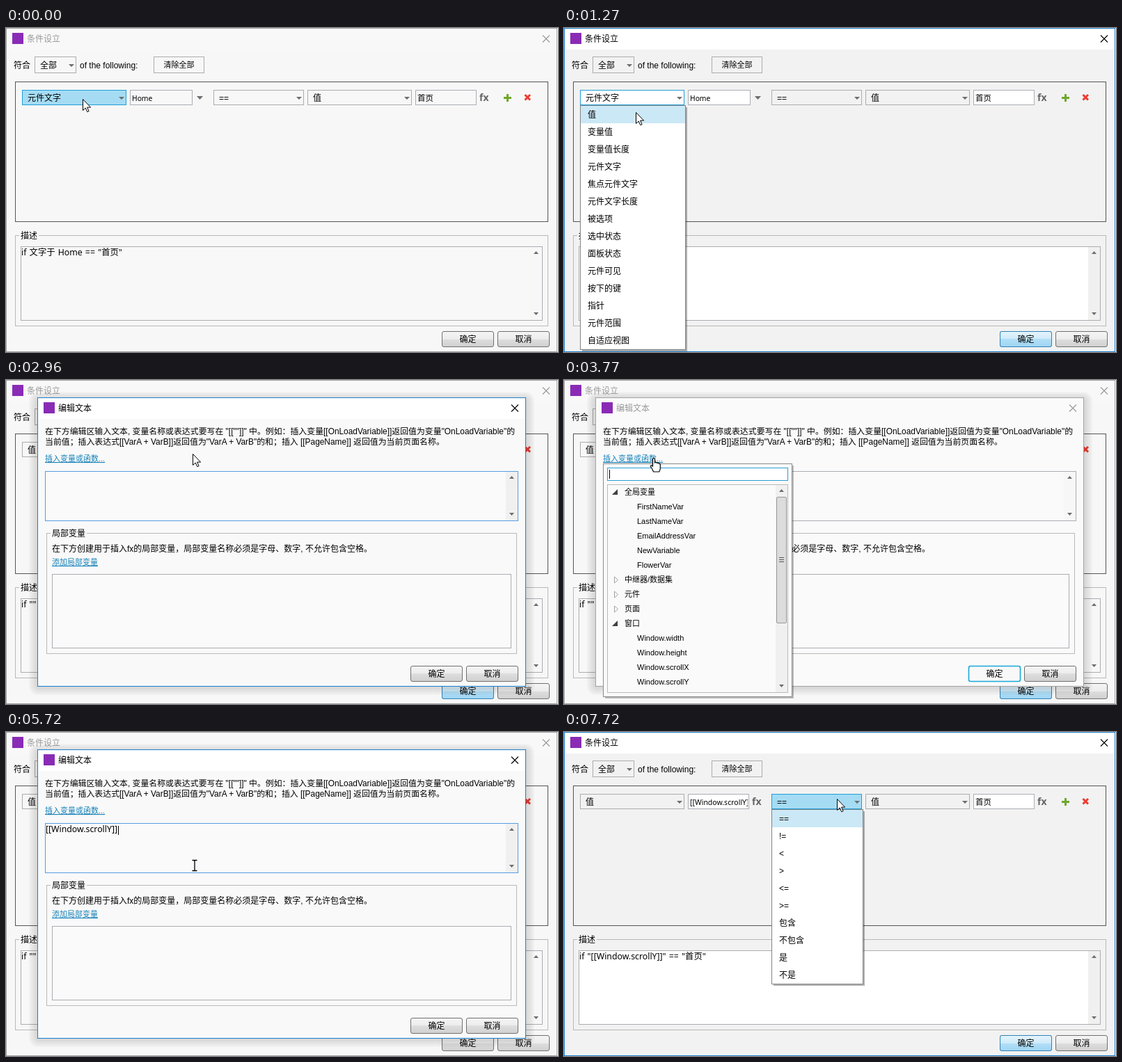
An HTML page that plays this animation: 793 px wide and 466 px high, repeating every 7.99 s.

```html
<!DOCTYPE html>
<html lang="zh-CN">
<head>
<meta charset="utf-8">
<title>条件设立</title>
<style>
html, body { margin: 0; width: 100%; height: 100%; overflow: hidden; background: #fff; }
svg { display: block; width: 793px; height: 466px; }
text { font: 12px "Liberation Sans", "Noto Sans CJK SC", sans-serif; fill: #000; white-space: pre; }
.ui { font-family: "Noto Sans", "Noto Sans CJK SC", sans-serif; }
.fx { font: bold 14px "Open Sans", "Noto Sans", sans-serif; fill: #666; }
.link { fill: #1480b8; text-decoration: underline; }
.win { --bar: #fff; --body: #f2f2f2; --field: #fff; --track: #f0f0f0; --edge: #1a80cf; --ink: #000; }
.win.off { --bar: #f8f8f8; --body: #f7f7f7; --field: #f8f8f8; --track: #f7f7f7; --edge: #a3a3a3; --ink: #999; }
.dialog { --body: #f9f9f9; --field: #fafafa; }
.dialog.off { --bar: #fafafa; --body: #fafafa; --field: #fafafa; }
.frame { fill: var(--body); stroke: var(--edge); }
.bar { fill: var(--bar); }
.title { fill: var(--ink); }
.cross { stroke: var(--ink); stroke-width: 1.1; fill: none; }
.field { fill: var(--field); stroke: #abadb3; }
.track { fill: var(--track); }
.combo { fill: var(--body); stroke: #acacac; }
.hot .combo { fill: #a5dcf4; stroke: #1f9fd8; }
.open .combo { fill: #fff; stroke: #1f9fd8; }
.tri { fill: #6d6d6d; }
.line { fill: none; stroke: #b9b9b9; }
.panel { fill: none; stroke: #555; }
.patch { fill: var(--body); }
.focus { stroke: #569de5; }
</style>
</head>
<body>
<script>
const LOOP = 7990;
const NS = "http://www.w3.org/2000/svg";
const make = (tag, attrs, parent) => {
  const node = document.createElementNS(NS, tag);
  for (const key in attrs) node.setAttribute(key, attrs[key]);
  return parent.appendChild(node);
};
const group = (parent, cls = "") => make("g", { class: cls }, parent);
const fill = (p, x, y, x2, y2, attrs) =>
  make("rect", { x, y, width: x2 - x, height: y2 - y, ...attrs }, p);
const box = (p, x, y, x2, y2, cls, more) =>
  fill(p, x + .5, y + .5, x2 - .5, y2 - .5, { class: cls, ...more });
const path = (p, d, attrs) => make("path", { d, ...attrs }, p);
const text = (p, x, y, str, size = 12, cls = "", anchor = "start") => {
  const node = make("text", { x, y, class: cls, "text-anchor": anchor }, p);
  node.style.fontSize = size + "px";
  node.textContent = str;
  return node;
};
const tri = (p, x, y, w = 4, h = 4) =>
  path(p, `M${x - w} ${y}h${2 * w}l${-w} ${h}z`, { class: "tri" });

const svg = make("svg", { viewBox: "0 0 793 466" }, document.body);
const defs = make("defs", {}, svg);
function gradient(id, stops) {
  const g = make("linearGradient", { id, x2: 0, y2: 1 }, defs);
  stops.forEach((color, i) =>
    make("stop", { offset: [0, .5, .5, 1][i], "stop-color": color }, g));
}
gradient("grey", ["#f5f5f5", "#ececec", "#dedede", "#d0d0d0"]);
gradient("blue", ["#e6f5fd", "#cfeafa", "#b2dff7", "#9fd5f3"]);

function button(p, x, y, label) {
  const shape = (color, stroke) => make("rect", {
    x: x + .5, y: y + .5, width: 74, height: 22, rx: 2.5, fill: color, stroke }, p);
  shape("url(#grey)", "#707070");
  const glow = shape("url(#blue)", "#2f83b8");
  const ring = shape("#f8f8f8", "#19a9d8");
  ring.setAttribute("stroke-width", 1.6);
  glow.style.opacity = ring.style.opacity = 0;
  text(p, x + 37.5, y + 16, label, 12, "", "middle");
  return { glow, ring };
}

function combo(p, x, y, x2, y2, label) {
  const g = group(p);
  box(g, x, y, x2, y2, "combo");
  g.label = text(g, x + 8, y + (y2 - y) / 2 + 4.5, label);
  tri(g, x2 - 7, (y + y2) / 2 - 1);
  return g;
}

function scrollArea(p, x, y, x2, y2) {
  const area = box(p, x, y, x2, y2, "field");
  fill(p, x2 - 18, y + 1, x2 - 1, y2 - 1, { class: "track" });
  tri(p, x2 - 9.5, y + 11, 3.5, -4);
  tri(p, x2 - 9.5, y2 - 12, 3.5, 4);
  return area;
}

function fieldset(p, x, y, x2, y2, label) {
  box(p, x, y, x2, y2, "line");
  fill(p, x + 6, y - 2, x + 10 + label.length * 12, y + 3, { class: "patch" });
  text(p, x + 8, y + 5, label);
}

function frame(p, x, y, x2, y2, label) {
  box(p, x, y, x2, y2, "frame");
  fill(p, x + 1, y + 1, x2 - 1, y + 31, { class: "bar" });
  fill(p, x + 9, y + 7, x + 25, y + 23, { fill: "#8a2bb5" });
  text(p, x + 30, y + 20, label, 12, "title");
  path(p, `M${x2 - 21} ${y + 10.5}l10 10m0 -10l-10 10`, { class: "cross" });
}

function list(x, x2, items) {
  const g = group(svg), bottom = 113 + items.length * 25;
  fill(g, x + 3, 114, x2 + 2, bottom + 2, { fill: "#000", opacity: .3 });
  box(g, x, 111, x2, bottom, "", { fill: "#fff", stroke: "#848484" });
  fill(g, x + 1, 112, x2 - 1, 137, { fill: "#cbe8f6" });
  items.forEach((item, i) => text(g, x + 11, 129 + i * 25, item));
  return g;
}

// Condition window
const main = group(svg, "win");
frame(main, 0, 0, 792, 466, "条件设立");
text(main, 11, 58, "符合");
combo(main, 41, 41, 101, 65, "全部");
text(main, 106, 58, "of the following:");
box(main, 212, 41, 285, 65, "combo");
text(main, 248.5, 57, "清除全部", 11, "", "middle");
box(main, 13, 77, 779, 279, "panel");

const kind = combo(main, 23, 89, 173, 111, "元件文字");
const home = group(main);
box(home, 178, 89, 268, 111, "field");
text(home, 181, 105, "Home", 10.3, "ui");
tri(home, 278.5, 98, 4.5, 5);

const formula = group(main);
const fxHover = box(formula, 266, 89, 288, 111, "", { fill: "#cbe8f6", stroke: "#26a0da" });
box(formula, 178, 89, 266, 111, "field");
const clip = make("clipPath", { id: "inner" }, defs);
fill(clip, 179, 90, 264, 110, {});
const typed = text(formula, 181, 105, "[[Window.scrollY]]", 10.5, "ui");
typed.setAttribute("clip-path", "url(#inner)");
text(formula, 270, 105, "fx", 14, "fx");

const operator = combo(main, 298, 89, 428, 111, "==");
combo(main, 433, 89, 583, 111, "值");
box(main, 588, 89, 676, 111, "field");
text(main, 591, 105, "首页", 11.5);
text(main, 680, 105, "fx", 14, "fx");
path(main, "M715 100.5h11m-5.5 -5.5v11", { stroke: "#6fa72c", "stroke-width": 3 });
path(main, "M745.5 96l7.5 7.5m0 -7.5l-7.5 7.5", { stroke: "#ef3b2f", "stroke-width": 3 });

fieldset(main, 13, 298, 779, 429, "描述");
scrollArea(main, 21, 314, 771, 421);
const description = text(main, 22, 327, "", 12.3, "ui");
description.style.wordSpacing = "1px";
const mainOk = button(main, 626, 436, "确定");
button(main, 706, 436, "取消");

const kinds = list(23, 175, ["值", "变量值", "变量值长度", "元件文字", "焦点元件文字",
  "元件文字长度", "被选项", "选中状态", "面板状态", "元件可见", "按下的键", "指针",
  "元件范围", "自适应视图"]);
const operators = list(298, 430,
  ["==", "!=", "<", ">", "<=", ">=", "包含", "不包含", "是", "不是"]);

// Text editing dialog
const dialog = group(svg, "win dialog");
for (let i = 1; i <= 5; i++)
  make("rect", { x: 45 - i * 2.4, y: 27 - i * 2, width: 702 + i * 4.8, height: 414 + i * 4.4,
    rx: 3 + i * 2, opacity: .028 }, dialog);
frame(dialog, 45, 25, 747, 441, "编辑文本");
text(dialog, 56, 78, '在下方编辑区输入文本, 变量名称或表达式要写在 "[[""]]" 中。例如：插入变量[[OnLoadVariable]]返回值为变量"OnLoadVariable"的', 11.9);
text(dialog, 56, 93, '当前值；插入表达式[[VarA + VarB]]返回值为"VarA + VarB"的和；插入 [[PageName]] 返回值为当前页面名称。', 11.9);
text(dialog, 56, 117, "插入变量或函数...", 11, "link");
const editor = scrollArea(dialog, 56, 131, 736, 203);
const inserted = text(dialog, 57, 144, "[[Window.scrollY]]", 12.3, "ui");
const editCaret = fill(dialog, 161, 135, 162, 148, {});
fieldset(dialog, 58, 220, 734, 394, "局部变量");
text(dialog, 66, 247, "在下方创建用于插入fx的局部变量，局部变量名称必须是字母、数字, 不允许包含空格。");
text(dialog, 66, 266, "添加局部变量", 11, "link");
box(dialog, 66, 279, 726, 386, "field");
const dialogOk = button(dialog, 581, 411, "确定");
button(dialog, 661, 411, "取消");

// Variable picker
const picker = group(svg);
fill(picker, 59, 123, 330, 458, { opacity: .25 });
box(picker, 56, 120, 328, 456, "", { fill: "#fafafa", stroke: "#8c8c8c" });
box(picker, 62, 126, 322, 145, "", { fill: "#fff", stroke: "#2a9fd6" });
const findCaret = fill(picker, 65, 129, 66, 142, {});
box(picker, 62, 150, 322, 450, "", { fill: "#fafafa", stroke: "#b9b9b9" });
fill(picker, 304, 151, 321, 449, { fill: "#f0f0f0" });
make("rect", { x: 305.5, y: 168.5, width: 14, height: 181, rx: 1.5, fill: "#dcdcdc", stroke: "#989898" }, picker);
path(picker, "M309 255.5h7m-7 3h7m-7 3h7", { stroke: "#555" });
tri(picker, 312.5, 161, 3.5, -4);
tri(picker, 312.5, 438, 3.5, 4);
// "-" marks an open branch, "+" a closed one
["-全局变量", "FirstNameVar", "LastNameVar", "EmailAddressVar", "NewVariable", "FlowerVar",
  "+中继器/数据集", "+元件", "+页面", "-窗口", "Window.width", "Window.height",
  "Window.scrollX", "Window.scrollY"].forEach((item, i) => {
  const y = 161 + i * 21, mark = item[0];
  if (mark === "-") path(picker, `M69 ${y + 4}h8v-8z`, { fill: "#404040" });
  if (mark === "+") path(picker, `M72.5 ${y - 4}v9l5 -4.5z`, { fill: "#fff", stroke: "#a0a0a0" });
  const branch = "+-".includes(mark);
  text(picker, branch ? 87 : 105, y + 4, branch ? item.slice(1) : item, 11);
});

// Pointers, each drawn with its hot spot at the origin
const pointer = group(svg);
const shapes = {
  arrow: path(group(pointer), "M.5 .5v16l3.7 -3.5 2.6 5.7 2.3 -1 -2.5 -5.6h5z", { fill: "#fff", stroke: "#000" }),
  hand: path(group(pointer), "M-1.5 9V.5q1.5 -2 3 0V6q2 -1.3 3 .5 2 -1 2.8 .7 2 -.4 2 2V14q0 2 -1.5 5H-.5Q-2 15 -4.5 11.5q-.3 -3 3 -.5z", { fill: "#fff", stroke: "#000", "stroke-width": 1.2 }),
  beam: path(group(pointer), "M-3.5 -7.5h3l.5 1 .5 -1h3M0 -7v14M-3.5 7.5h3l.5 -1 .5 1h3", { fill: "none", stroke: "#000", "stroke-width": 1.3 })
};

const moves = [
  [0, 110, 102], [1020, 109, 107], [1150, 105, 117], [1270, 103, 121],
  [2170, 108, 121], [2300, 130, 120], [2440, 175, 118], [2560, 232, 110], [2680, 268, 106],
  [3100, 230, 108], [3220, 180, 110], [3350, 140, 112, "hand"], [3500, 129, 113, "hand"],
  [4050, 128, 200], [4210, 126, 253], [4350, 122, 310], [4470, 111, 368],
  [4620, 115, 400], [4740, 122, 425], [4870, 125, 430],
  [5300, 165, 425], [5440, 215, 360], [5570, 271, 282, "beam"], [5720, 271, 192, "beam"],
  [5850, 271, 173, "beam"], [6010, 269, 165, "beam"], [6310, 300, 190, "beam"],
  [6430, 400, 270], [6550, 510, 350], [6670, 590, 410], [6790, 623, 425],
  [7170, 560, 350], [7320, 470, 210], [7450, 400, 110], [7600, 396, 100], [7720, 392, 96]
];
const descriptions = [
  [0, 'if 文字于 Home == "首页"'],
  [1780, 'if "" == "首页"'],
  [7050, 'if "[[Window.scrollY]]" == "首页"']
];
const pulse = [[0, 0], [720, 0], [1270, 1], [1900, .35], [2680, .85], [2960, 1],
  [4990, 1], [5570, 0], [6930, 0], [7450, .9], [7720, 1], [LOOP, 1]];

const stepAt = (table, t) => table.filter(row => row[0] <= t).pop();
const levelAt = (table, t) => {
  const i = table.findIndex(row => row[0] > t);
  const [t0, a] = table[i - 1], [t1, b] = table[i];
  return a + (b - a) * (t - t0) / (t1 - t0);
};
const show = (node, on) => { node.style.display = on ? "" : "none"; };
const setClass = (node, name, on) => node.classList.toggle(name, on);

function draw(t) {
  const within = (a, b) => t >= a && t < b;

  setClass(main, "off", t < 720 || within(2830, 6930));
  setClass(kind, "hot", t < 1020 || within(1780, 2560));
  setClass(kind, "open", within(1020, 1780));
  kind.label.textContent = t < 1780 ? "元件文字" : "值";
  show(home, t < 1780);
  show(formula, t >= 1780);
  show(fxHover, within(2680, 7050));
  show(typed, t >= 7050);
  setClass(operator, "hot", t >= 7600);
  description.textContent = stepAt(descriptions, t)[1];
  mainOk.glow.style.opacity = levelAt(pulse, t);
  show(kinds, within(870, 1780));
  show(operators, t >= 7600);

  show(dialog, within(2830, 6930));
  dialog.style.opacity = t < 2960 ? .5 : 1;
  setClass(dialog, "off", within(3770, 5300));
  setClass(editor, "focus", within(2960, 3770) || t >= 5300);
  show(inserted, t >= 5300);
  show(editCaret, within(5300, 6010) || within(6550, 6930));
  dialogOk.ring.style.opacity = within(3350, 5300) ? 1 : 0;
  dialogOk.glow.style.opacity = t >= 6670 ? 1 : 0;
  show(picker, within(3500, 5300));
  picker.style.opacity = t < 3620 ? .5 : 1;
  show(findCaret, within(3770, 4210) || t >= 4620);

  const [, x, y, shape = "arrow"] = stepAt(moves, t);
  pointer.setAttribute("transform", `translate(${x} ${y})`);
  for (const name in shapes) show(shapes[name], name === shape);
}

const start = performance.now();
function tick() {
  draw((performance.now() - start) % LOOP);
  requestAnimationFrame(tick);
}
tick();
</script>
</body>
</html>
```
